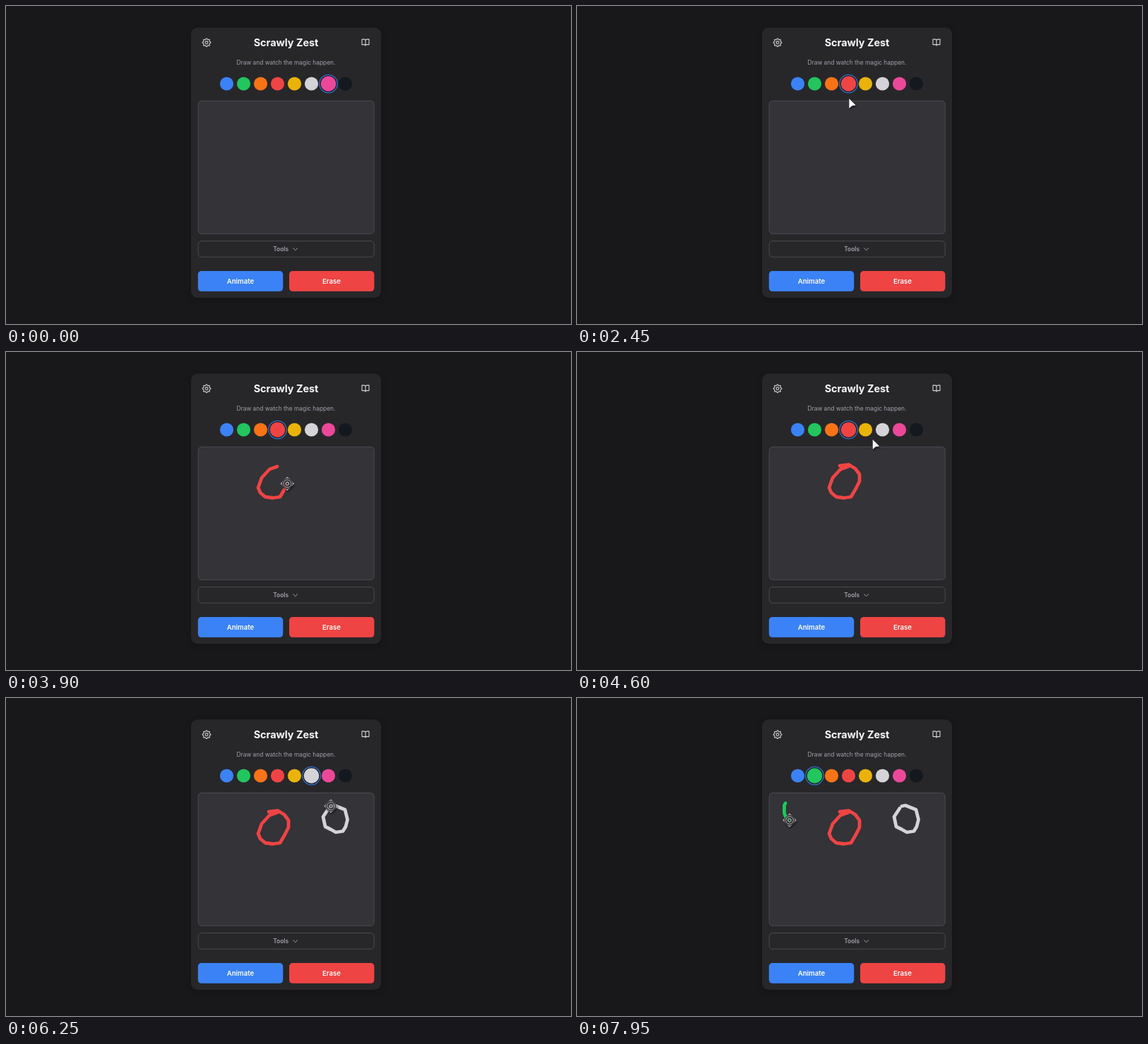
Animation, 800 px wide and 450 px high, one loop 8 s. Source, as an HTML page:

```html
<!DOCTYPE html>
<html lang="en">
<head>
<meta charset="utf-8">
<title>Scrawly Zest</title>
<style>
  html, body { margin: 0; width: 100%; height: 100%; overflow: hidden; background: #18181b; }
  svg { display: block; width: 100vw; height: 100vh; }
  text { font-family: Inter, "Open Sans", sans-serif; text-anchor: middle; }
  .line { fill: none; stroke: #d4d4d8; stroke-linecap: round; stroke-linejoin: round; }
  #card { filter: drop-shadow(0 3px 4px rgba(0, 0, 0, .18)); }
  #cursor { filter: drop-shadow(1.5px 2px 1px rgba(0, 0, 0, .55)); }
</style>
</head>
<body>
<svg viewBox="0 0 800 450">
  <rect id="card" x="262" y="30.5" width="269" height="382.5" rx="9.6" fill="#27272a"/>
  <path id="gear" class="line" stroke-width="1.1"/>
  <circle class="line" cx="284" cy="51.8" r="1.9" stroke-width="1.1"/>
  <path class="line" stroke-width="2.2" transform="translate(503 45.6) scale(.5)"
    d="M2 3h6a4 4 0 0 1 4 4v14a3 3 0 0 0-3-3H2zM22 3h-6a4 4 0 0 0-4 4v14a3 3 0 0 1 3-3h7z"/>
  <text x="396.5" y="57.3" font-size="14.4" font-weight="700" fill="#fafafa">Scrawly Zest</text>
  <text x="396.5" y="83" font-size="8.4" fill="#a1a1aa">Draw and watch the magic happen.</text>
  <g id="swatches"></g>
  <rect x="272.2" y="134.3" width="249" height="188" rx="4.8" fill="#333338" stroke="#52525b" stroke-width=".8"/>
  <g id="strokes" fill="none" stroke-width="4.8" stroke-linecap="round" stroke-linejoin="round"></g>
  <rect x="272.2" y="332.6" width="249" height="22.6" rx="4.8" fill="#27272a" stroke="#52525b" stroke-width=".8"/>
  <text x="389.2" y="347" font-size="8.4" font-weight="600" fill="#a1a1aa">Tools</text>
  <path class="line" d="M406.6 342.7l3 3 3-3" style="stroke:#a1a1aa"/>
  <rect x="271.8" y="375" width="120.4" height="28.8" rx="4.8" fill="#3b82f6"/>
  <rect x="401" y="375" width="120.4" height="28.8" rx="4.8" fill="#ef4444"/>
  <g font-size="9.6" font-weight="600" fill="#fff">
    <text x="332" y="393">Animate</text>
    <text x="461" y="393">Erase</text>
  </g>
  <g id="cursor">
    <path id="arrow" d="M0 0V12.6L3.8 9.4 8.6 8.6Z" fill="#fff" stroke="#fff" stroke-width=".5" stroke-linejoin="round"/>
    <g id="target" fill="none" stroke="#b9b9bd">
      <path d="M0-9.4L9.4 0 0 9.4-9.4 0Z" fill="#29292c" fill-opacity=".55"/>
      <circle r="6.6" stroke="#303034" stroke-width="1.1"/>
      <circle r="5.3"/>
      <circle r="2.2" stroke-width="1.1"/>
      <path d="M0-9v2M0 7v2M-9 0h2M7 0h2"/>
    </g>
  </g>
</svg>
<script>
const LOOP = 8000, STEP = 50, FADE = 150;
const $ = id => document.getElementById(id);

function add(parent, tag, attrs) {
  const el = document.createElementNS('http://www.w3.org/2000/svg', tag);
  for (const key in attrs) el.setAttribute(key, attrs[key]);
  return parent.appendChild(el);
}

const colors = ['#3b82f6', '#22c55e', '#f97316', '#ef4444', '#eab308', '#d4d4d8', '#ec4899', '#14181f'];
// Selected swatch: time, index
const picks = [[-FADE, 6], [1950, 3], [5100, 5], [6850, 1]];

const track = [];   // pointer stops: time, x, y
const strokes = [];

function move(...stops) {
  track.push(...stops);
}

// The pointer passes the points at an even pace and leaves a line.
function draw(color, from, to, points) {
  points.forEach(([x, y], i) => track.push([from + (to - from) * i / (points.length - 1), x, y]));
  strokes.push({ from, to, el: add($('strokes'), 'path', { stroke: colors[color] }) });
}

move([850, 12, 215], [1500, 314, 170], [1700, 377, 114], [2150, 384, 112], [2700, 387, 148]);
draw(3, 3200, 4250, [
  [384, 162], [373, 166], [362, 178], [357, 192], [360, 199], [367, 205], [378, 206.5],
  [388, 205], [395, 193], [400, 183], [400, 173], [394, 165], [385, 159.5], [372, 161]
]);
move([4600, 419, 124.5], [4800, 431, 111], [5150, 432, 111]);
draw(5, 5500, 6250, [
  [457, 156], [449, 168], [452, 182], [460, 186], [467, 190], [477, 188.5],
  [481, 182], [483.5, 172], [480, 158], [465, 152], [460, 153]
]);
move([6750, 327, 111], [7000, 333, 112], [7450, 317, 150], [7650, 300, 150]);
draw(1, 7700, 7950, [[295, 149], [293.5, 152], [293.5, 163], [295, 167], [301, 173]]);

const swatches = colors.map((fill, i) => {
  const g = add($('swatches'), 'g', {});
  const ring = add(g, 'g', {});
  add(ring, 'circle', { r: 10.8, fill: '#18181b' });
  add(ring, 'circle', { r: 11.3, fill: 'none', stroke: '#3470c4', 'stroke-width': 1.2 });
  add(g, 'circle', { r: 9.6, fill });
  return { g, ring, x: 312.5 + 24 * i };
});

const teeth = Array.from({ length: 32 }, (_, i) => {
  const a = (i - .5) * Math.PI / 16, r = i % 4 < 2 ? 5.8 : 4.5;
  return (284 + r * Math.cos(a)).toFixed(2) + ' ' + (51.8 + r * Math.sin(a)).toFixed(2);
});
$('gear').setAttribute('d', 'M' + teeth.join('L') + 'Z');

function pointerAt(t) {
  const next = track.findIndex(p => p[0] > t);
  if (next < 0) return track[track.length - 1].slice(1);
  if (next === 0) return track[0].slice(1);
  const [a, x, y] = track[next - 1], [b, u, v] = track[next];
  const k = (t - a) / (b - a);
  return [x + (u - x) * k, y + (v - y) * k];
}

function pickLevel(i, t) {
  const now = picks.filter(p => p[0] <= t).length - 1;
  const k = Math.min(1, (t - picks[now][0]) / FADE), eased = k * k * (3 - 2 * k);
  if (picks[now][1] === i) return eased;
  return now > 0 && picks[now - 1][1] === i ? 1 - eased : 0;
}

function render(t) {
  swatches.forEach(({ g, ring, x }, i) => {
    const level = pickLevel(i, t);
    g.setAttribute('transform', `translate(${x} 110) scale(${1 + .12 * level})`);
    ring.setAttribute('opacity', level);
  });

  const [x, y] = pointerAt(t);
  for (const { from, to, el } of strokes) {
    const points = track.filter(p => p[0] >= from && p[0] <= Math.min(t, to)).map(p => p[1] + ' ' + p[2]);
    if (t >= from && t <= to) points.push(x + ' ' + y);
    el.setAttribute('d', points.length ? 'M' + points.join('L') : '');
  }

  const inside = x > 272 && x < 521 && y > 134 && y < 322;
  $('cursor').setAttribute('transform', `translate(${x} ${y})`);
  $('cursor').style.display = t < track[0][0] ? 'none' : '';
  $('arrow').style.display = inside ? 'none' : '';
  $('target').style.display = inside ? '' : 'none';
}

const start = performance.now();
function tick() {
  const t = (performance.now() - start) % LOOP;
  render(Math.floor(t / STEP) * STEP);
  requestAnimationFrame(tick);
}
tick();
</script>
</body>
</html>
```
